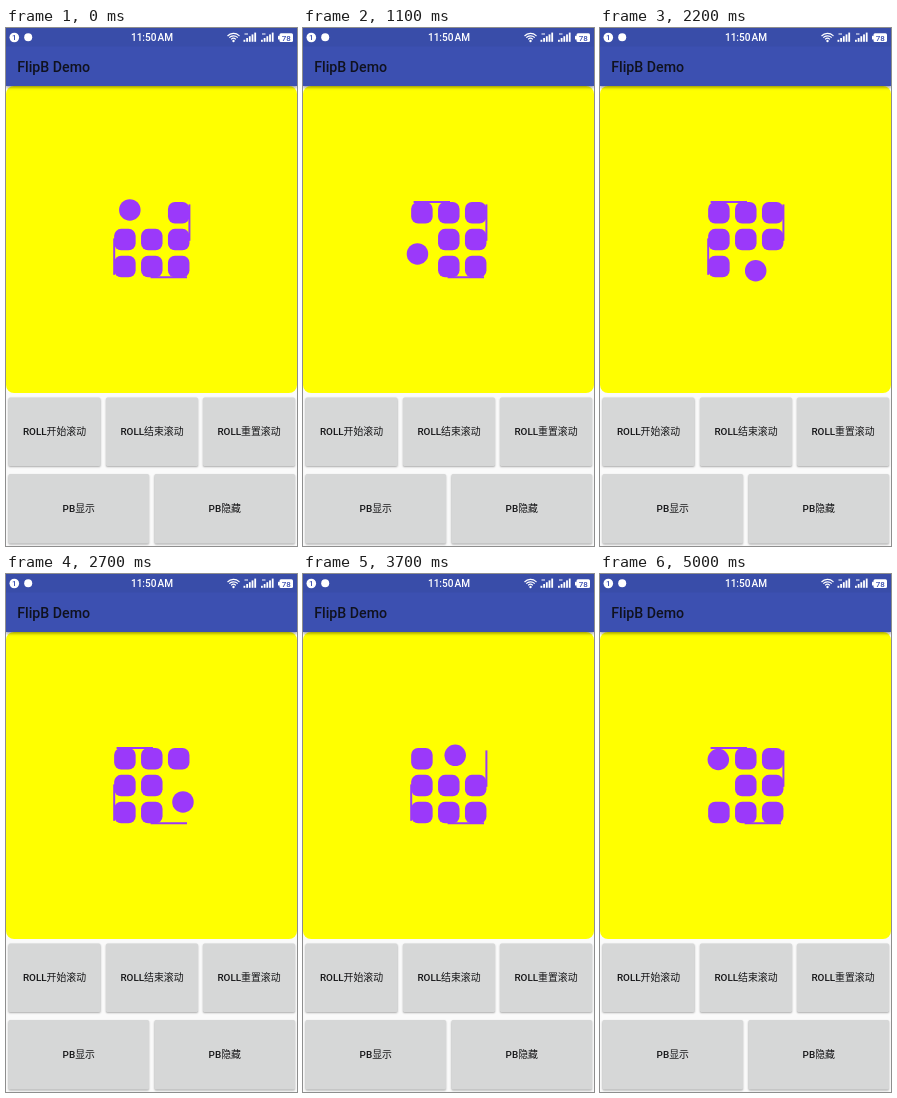
An HTML page with a canvas for the animation above (5100 ms loop, 291x518 px).

```html
<!DOCTYPE html>
<html lang="zh-CN">
<head>
<meta charset="utf-8">
<style>
  html, body { margin: 0; width: 100%; height: 100%; overflow: hidden; background: #fafafa; }
  canvas { display: block; width: 291px; height: 518px; }
</style>
</head>
<body>
<canvas id="stage"></canvas>
<script>
const W = 291, H = 518, LOOP = 5100, STEP = 100;
const canvas = document.getElementById('stage');
const ctx = canvas.getContext('2d');
const ratio = window.devicePixelRatio || 1;
canvas.width = W * ratio;
canvas.height = H * ratio;

const FONT = 'Roboto, "Noto Sans CJK SC", "Noto Sans CJK", sans-serif';
const PURPLE = '#9b39fa', BAR = '#3c50b1';

// Grid geometry
const CX = 145.8, CY = 211.6, SIZE = 21.5, PITCH = 26.9;
const HALF = SIZE / 2, GAP = PITCH - SIZE, ARM = SIZE / Math.SQRT2;

// Outer cells, clockwise from the top left
const RING = [[-1, -1], [0, -1], [1, -1], [1, 0], [1, 1], [0, 1], [-1, 1], [-1, 0]];

// [ms, number of rolls completed]
const PACE = [[0, .295], [600, 1.564], [1600, 3.396], [2700, 5.564],
              [3300, 6.625], [4200, 8.226], [5000, 9.88]];

function rollsAt(ms) {
  const i = Math.max(1, PACE.findIndex(([t]) => t >= ms));
  const [t0, v0] = PACE[i - 1], [t1, v1] = PACE[i];
  return v0 + (v1 - v0) * (ms - t0) / (t1 - t0);
}

function box(x, y, w, h, r, color) {
  ctx.fillStyle = color;
  ctx.beginPath();
  ctx.roundRect(x, y, w, h, r);
  ctx.fill();
}

function disc(x, y, r, color) {
  ctx.fillStyle = color;
  ctx.beginPath();
  ctx.arc(x, y, r, 0, Math.PI * 2);
  ctx.fill();
}

function label(text, x, y, size, color, align = 'center') {
  ctx.font = `500 ${size}px ${FONT}`;
  ctx.textAlign = align;
  ctx.textBaseline = 'alphabetic';
  ctx.fillStyle = color;
  ctx.fillText(text, x, y);
}

function shadow(color, blur, dy) {
  ctx.shadowColor = color;
  ctx.shadowBlur = blur * ratio;
  ctx.shadowOffsetY = dy * ratio;
}

function wifi(x, y) {
  ctx.strokeStyle = '#fff';
  ctx.lineWidth = 1.2;
  for (const r of [3.2, 5.8, 8.2]) {
    ctx.beginPath();
    ctx.arc(x, y, r, -Math.PI * .76, -Math.PI * .24);
    ctx.stroke();
  }
  disc(x, y - .6, 1.2, '#fff');
}

function signal(x) {
  ctx.fillStyle = '#fff';
  for (let i = 0; i < 5; i++) {
    const h = 2 + i * 1.8;
    ctx.fillRect(x + i * 2.7, 13.8 - h, 1.8, h);
  }
  ctx.fillRect(x + 1, 5.5, 3.5, 1);
}

function statusBar() {
  disc(8.3, 9.5, 4.8, '#fff');
  label('1', 8.2, 12.4, 8, BAR);
  disc(22.2, 9.3, 4, '#fff');
  label('11:50\u200aAM', 146, 13.2, 10.1, '#fff');
  wifi(227.5, 13.6);
  signal(237.5);
  signal(255);
  box(273.5, 5.3, 13.5, 8.6, 1.5, '#fff');
  box(272, 7.7, 2, 3.8, .5, '#fff');
  label('78', 280.3, 12.6, 8, BAR);
}

function button(text, x, y, w, h) {
  shadow('rgba(0,0,0,.32)', 2, 1);
  box(x, y, w, h, 1.5, '#d6d7d7');
  shadow('transparent', 0, 0);
  label(text, x + w / 2, y + h / 2 + 3.6, 9.9, '#151517');
}

function screen() {
  ctx.fillStyle = '#fafafa';
  ctx.fillRect(0, 0, W, H);
  box(0, 58, W, 307, 8, '#ff0');
  shadow('rgba(0,0,0,.4)', 3, 1.5);
  box(0, 0, W, 58, 0, BAR);
  shadow('transparent', 0, 0);
  box(0, 0, W, 18.5, 0, '#394da9');
  statusBar();
  label('FlipB Demo', 11.3, 44, 14.2, '#10121f', 'left');

  button('ROLL开始滚动', 2.5, 369.5, 92, 68.5);
  button('ROLL结束滚动', 100, 369.5, 92, 68.5);
  button('ROLL重置滚动', 197, 369.5, 92, 68.5);
  button('PB显示', 2.5, 446, 140.5, 69.5);
  button('PB隐藏', 148.5, 446, 140.5, 69.5);
}

function blocks(ms) {
  const rolls = rollsAt(ms), count = Math.floor(rolls);
  const p = (1 - Math.cos(Math.PI * (rolls - count))) / 2;
  const index = (16 - count) % 8;
  const from = RING[index], to = RING[(index + 1) % 8];

  ctx.save();
  ctx.translate(CX, CY);

  for (let side = 0; side < 4; side++) {
    if (side !== Math.floor(index / 2)) box(-35.2, -38.6, 36.4, 2, 0, PURPLE);
    ctx.rotate(Math.PI / 2);
  }

  for (const cell of [...RING, [0, 0]]) {
    if (cell === from || cell === to) continue;
    box(cell[0] * PITCH - HALF, cell[1] * PITCH - HALF, SIZE, SIZE, 7, PURPLE);
  }

  // Quarter turn about the leading inner corner, which slides across the gap
  const dx = to[0] - from[0], dy = to[1] - from[1];
  const angle = Math.PI / 4 + p * Math.PI / 2;
  const ahead = HALF + GAP * p - ARM * Math.cos(angle);
  const inward = HALF - ARM * Math.sin(angle);
  disc(from[0] * PITCH + dx * ahead - dy * inward,
       from[1] * PITCH + dy * ahead + dx * inward, HALF, PURPLE);
  ctx.restore();
}

const start = performance.now();

function frame() {
  const elapsed = (performance.now() - start) % LOOP;
  ctx.setTransform(ratio, 0, 0, ratio, 0, 0);
  screen();
  blocks(Math.floor(elapsed / STEP) * STEP);
  requestAnimationFrame(frame);
}
frame();
</script>
</body>
</html>
```
